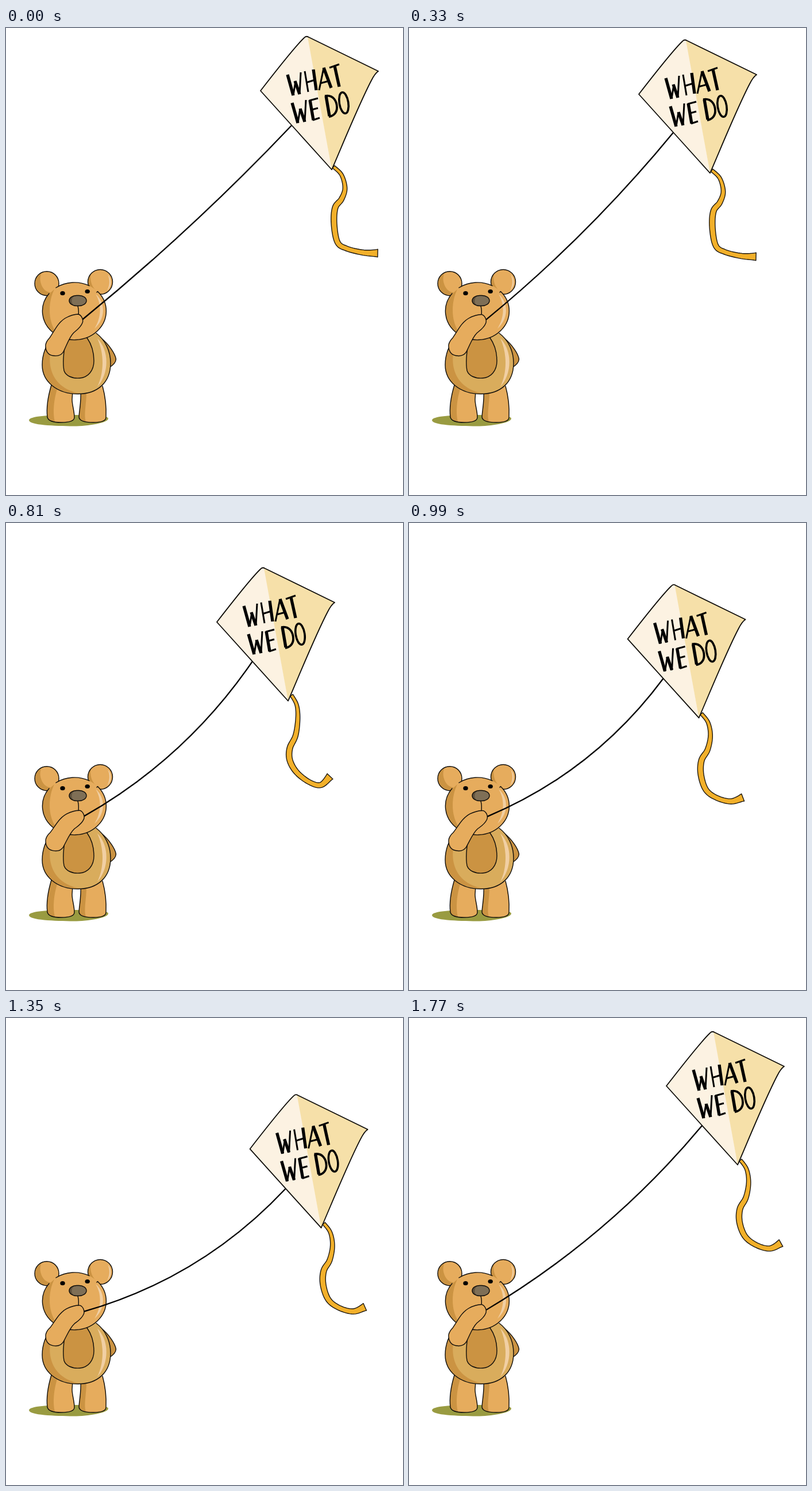
An HTML page for the animation above (1.8 s loop, 691 by 811 pixels).

```html
<!DOCTYPE html>
<html lang="en">
<head>
<meta charset="utf-8">
<title>Bear with a kite</title>
<style>
  html, body { margin: 0; width: 100%; height: 100%; overflow: hidden; background: #fff; }
  svg { display: block; width: 100vw; height: 100vh; }
  .line { fill: none; }
  .fur { fill: #e6ac5d; }
  .shade { fill: #cb9342; }
  .shine { fill: #f1cfa3; }
  .ink { stroke: #0f0d0a; stroke-width: 1.4; stroke-linejoin: round; stroke-linecap: round; }
  .bold { stroke-width: 5.3; }
  .thin { stroke-width: 3; }
</style>
</head>
<body>
<svg viewBox="0 0 691 811">
  <path fill="#999b41" d="M40 681C41 674 75 672 110 672C145 672 178 673 178 678C178 686 142 691.500 118 691.500C85 691 40 690 40 681Z"/>

  <g id="bear">
    <path class="shade ink" d="M165 538C180 550 190 566 191.500 575C191 581 186 586 180 589Z"/>

    <path class="fur" d="M79 620C73 640 70 660 72 676C74 684 86 685 96 685C108 685 119 683 119 676C119 665 115 655 115 645L116 630Z"/>
    <path class="shade" d="M79 620C73 640 70 660 72 676C74 682 79 683 85 684C81 668 83 645 90 624Z"/>
    <path class="line ink" d="M79 620C73 640 70 660 72 676C74 684 86 685 96 685C108 685 119 683 119 676C119 665 115 655 115 645L116 630"/>
    <path class="fur" d="M168 622C173 640 175 655 174 676C174 683 163 685 152 685C138 685 127 683 127 675C128 660 131 650 130 630Z"/>
    <path class="shade" d="M130 634C131 650 128 660 127 675C127 681 132 683 139 684C135 672 140 652 140 634Z"/>
    <path class="line ink" d="M168 622C173 640 175 655 174 676C174 683 163 685 152 685C138 685 127 683 127 675C128 660 131 650 130 630"/>

    <path fill="#d9ac5c" d="M85 535C68 548 63 570 63 585C63 615 90 635.500 125 635.500C160 635.500 182 615 182 582C182 560 172 541 157 530Z"/>
    <path class="shade" d="M85 535C68 548 63 570 63 585C63 615 90 635.500 130 635C70 624 68 570 87 535Z"/>
    <path class="shine" d="M159 539C180 560 180 600 159 623C171 598 171 565 159 539Z"/>
    <path class="line ink" d="M85 535C68 548 63 570 63 585C63 615 90 635.500 125 635.500C160 635.500 182 615 182 582C182 560 172 541 157 530"/>
    <path class="shade ink" d="M105 540C99 565 99 585 101 595C104 604 115 609 128 608C143 607 153 595 153 578C153 560 148 548 141 538Z"/>

    <circle class="shade" cx="71" cy="443.700" r="21"/>
    <path class="fur" d="M62 425C72 420 86 424 91 440L92 456L78 459C64 460 55 438 62 425Z"/>
    <circle class="line ink" cx="71" cy="443.700" r="21"/>
    <circle class="fur" cx="164" cy="441" r="21.500"/>
    <path class="shade" d="M148 427C140 436 142 448 146 455L166 462C152 456 145 442 148 427Z"/>
    <path class="shine" d="M177 428C185 436 184 449 176 456C181 446 181 437 177 428Z"/>
    <circle class="line ink" cx="164" cy="441" r="21.500"/>

    <ellipse class="fur" cx="119" cy="492" rx="55.500" ry="50"/>
    <path class="shade" d="M76 461A56 50 0 0 0 95 537C72 518 72 478 84 454Z"/>
    <path class="shine" d="M156 462C174 478 173 505 154 522C166 503 167 480 156 462Z"/>
    <path class="line ink" d="M87 451A55.500 50 0 0 1 145 447.700M158 459L159.500 457.500A55.500 50 0 1 1 75 461"/>
    <ellipse cx="98.500" cy="460.700" rx="4.200" ry="3.600"/>
    <ellipse cx="141.700" cy="457.500" rx="4.200" ry="3.600"/>
    <rect fill="#7f6f56" x="110" y="464.500" width="30" height="18" rx="13" ry="9"/>
    <path fill="#5f513d" d="M119 465C107 467 107 480 118 482C113 477 113 470 119 465Z"/>
    <rect class="line ink" x="110" y="464.500" width="30" height="18" rx="13" ry="9"/>
    <path class="line ink" d="M125 483Q127 490 126 500"/>
  </g>

  <path id="string" class="line" stroke="#000" stroke-width="2.300"/>
  <path id="arm" class="fur ink" d="M76 538C85 525 90 512 103 504C112 499 120 497 126 497C132 499 135 507 133 512C130 520 124 524 118 529C110 537 106 550 100 562C96 569 88 570 82 569C73 568 68 560 69 550C70 545 73 541 76 538Z"/>
  <path id="tail" fill="#f2b02a" stroke="#1c1710" stroke-width="1.400" stroke-linejoin="round"/>

  <g id="kite">
    <path fill="#fcf2e2" d="M443 109Q502 33 519 17Q522 14 526 16L567 246Z"/>
    <path fill="#f6e0a9" d="M525 15.500L648 75Q642 79 636 91C615 131 589 195 567 246Z"/>
    <path class="line ink" d="M443 109Q502 33 519 17Q522 13 527 16L648 75Q642 79 636 91C615 131 589 195 567 246Z" style="stroke-width:1.800"/>
    <g role="img" aria-label="What we do" fill="none" stroke="#000" stroke-linejoin="bevel">
      <path class="bold" d="M490 81L500 117M503 92L511 115M535 72L540 108M553 69L566 104M572 66L580 102"/>
      <path class="thin" d="M500 117L504 92M511 115L513 77M520 75L526 111M522 95L538 90M545 108L553 69M547 96L562 92M563 69L580 63"/>
      <path class="bold" d="M498 130L508 165M512 140L520 163M529 125L535 160M557 118L563 153"/>
      <path class="thin" d="M508 165L512 140M520 163L522 125M528 126L543 122M532 142L543 139M534 160L546 156"/>
      <path stroke-width="3.800" d="M555 118C570 115 576 128 576 138C576 147 570 153 562 154"/>
      <ellipse stroke-width="3.600" cx="588" cy="130" rx="7.800" ry="18.500" transform="rotate(-9 588 130)"/>
    </g>
  </g>
</svg>
<script>
const LOOP = 1800, STEP = 30;
const HOME = [522, 15];          // where the kite's top corner is drawn
const KEEL = [45, 231];          // bottom corner, from the top one
const PIVOT = [85, 555], HAND = [131, 508];

// time, x and y of the kite's top corner, swing of the tail
const flight = [
  [0, 522, 15, 0], [330, 479, 21, 0], [600, 454, 43, 0], [810, 446, 78, 1],
  [1140, 477, 124, 0.1], [1560, 524, 102, 1], [1620, 526, 79.5, 0.95], [1770, 527, 24, 0.65]
];

// Middle line of the tail from the keel, at both ends of its swing
const curled = [[3, -5], [17, 9], [23, 32], [17, 51], [6, 66], [4, 94], [10, 126], [26, 137], [55, 144], [80, 145]];
const swung = [[6, -10], [15, 7], [17, 30], [13, 60], [3, 82], [3, 103], [15, 124], [37, 141], [57, 146], [73, 131]];

const $ = id => document.getElementById(id);
const mix = (a, b, u) => a + (b - a) * u;
const swell = (t, period) => Math.sin(Math.PI * t / period) ** 2;

// Slope of column c at key i, from the parabola through its neighbours
function slope(keys, i, c) {
  const j = Math.min(Math.max(i, 1), keys.length - 2);
  const [a, b, d] = [keys[j - 1], keys[j], keys[j + 1]];
  const h0 = b[0] - a[0], h1 = d[0] - b[0];
  const s0 = (b[c] - a[c]) / h0, s1 = (d[c] - b[c]) / h1;
  const bend = (s1 - s0) / (h0 + h1);
  return s0 + bend * h0 + 2 * bend * (keys[i][0] - b[0]);
}

function place(t) {
  let i = 0;
  while (i < flight.length - 2 && t >= flight[i + 1][0]) i++;
  const a = flight[i], b = flight[i + 1], h = b[0] - a[0], u = (t - a[0]) / h, v = 1 - u;
  const ease = u * u * (3 - 2 * u);
  const glide = c => mix(a[c], b[c], ease)
    + h * u * v * (v * slope(flight, i, c) - u * slope(flight, i + 1, c));
  return [glide(1), glide(2), mix(a[3], b[3], ease)];
}

// Point at s on the smooth curve through a list of points
function along(points, s) {
  const last = points.length - 1, i = Math.min(Math.floor(s), last - 1), u = s - i;
  const at = k => points[Math.min(Math.max(k, 0), last)];
  return [0, 1].map(n => {
    const [a, b, c, d] = [at(i - 1)[n], at(i)[n], at(i + 1)[n], at(i + 2)[n]];
    return b + u / 2 * (c - a + u * (2 * a - 5 * b + 4 * c - d + u * (3 * (b - c) + d - a)));
  });
}

function ribbon(points) {
  const left = [], right = [], n = 72, end = points.length - 1;
  for (let k = 0; k <= n; k++) {
    const u = k / n, s = end * u;
    const [x, y] = along(points, s);
    const [ax, ay] = along(points, Math.max(s - 0.1, 0));
    const [bx, by] = along(points, Math.min(s + 0.1, end));
    const half = 2.8 + 2.2 * Math.sin(Math.PI * u) ** 2 + 4 * u ** 8;
    const w = half / Math.hypot(bx - ax, by - ay);
    const nx = (by - ay) * w, ny = (ax - bx) * w;
    left.push([x + nx, y + ny]);
    right.unshift([x - nx, y - ny]);
  }
  return "M" + left.concat(right).join("L") + "Z";
}

function draw(t) {
  const [x, y, swing] = place(t);
  $("kite").setAttribute("transform", `translate(${x - HOME[0]} ${y - HOME[1]})`);
  $("tail").setAttribute("transform", `translate(${x + KEEL[0]} ${y + KEEL[1]})`);
  $("tail").setAttribute("d", ribbon(curled.map((p, i) => p.map((v, n) => mix(v, swung[i][n], swing)))));

  const angle = 3.5 * swell(t, 2100), r = angle * Math.PI / 180;
  $("arm").setAttribute("transform", `rotate(${angle} ${PIVOT})`);

  // The string leaves the hand, sags across its length and slips along the kite's edge
  const hx = HAND[0] - PIVOT[0], hy = HAND[1] - PIVOT[1];
  const x0 = PIVOT[0] + hx * Math.cos(r) - hy * Math.sin(r);
  const y0 = PIVOT[1] + hx * Math.sin(r) + hy * Math.cos(r);
  const slip = 8 * Math.exp(-t / 250);
  const x1 = x - 17 - slip, y1 = y + 163 - slip * 1.1;
  const pull = 2 * (8 + 21 * swell(t, 2500)) / Math.hypot(x1 - x0, y1 - y0);
  const cx = (x0 + x1) / 2 + (y0 - y1) * pull, cy = (y0 + y1) / 2 + (x1 - x0) * pull;
  $("string").setAttribute("d", `M${x0} ${y0}Q${cx} ${cy} ${x1} ${y1}`);
}

function tick() {
  const t = performance.now() % LOOP;
  draw(Math.floor(t / STEP) * STEP);
  requestAnimationFrame(tick);
}
tick();
</script>
</body>
</html>
```
